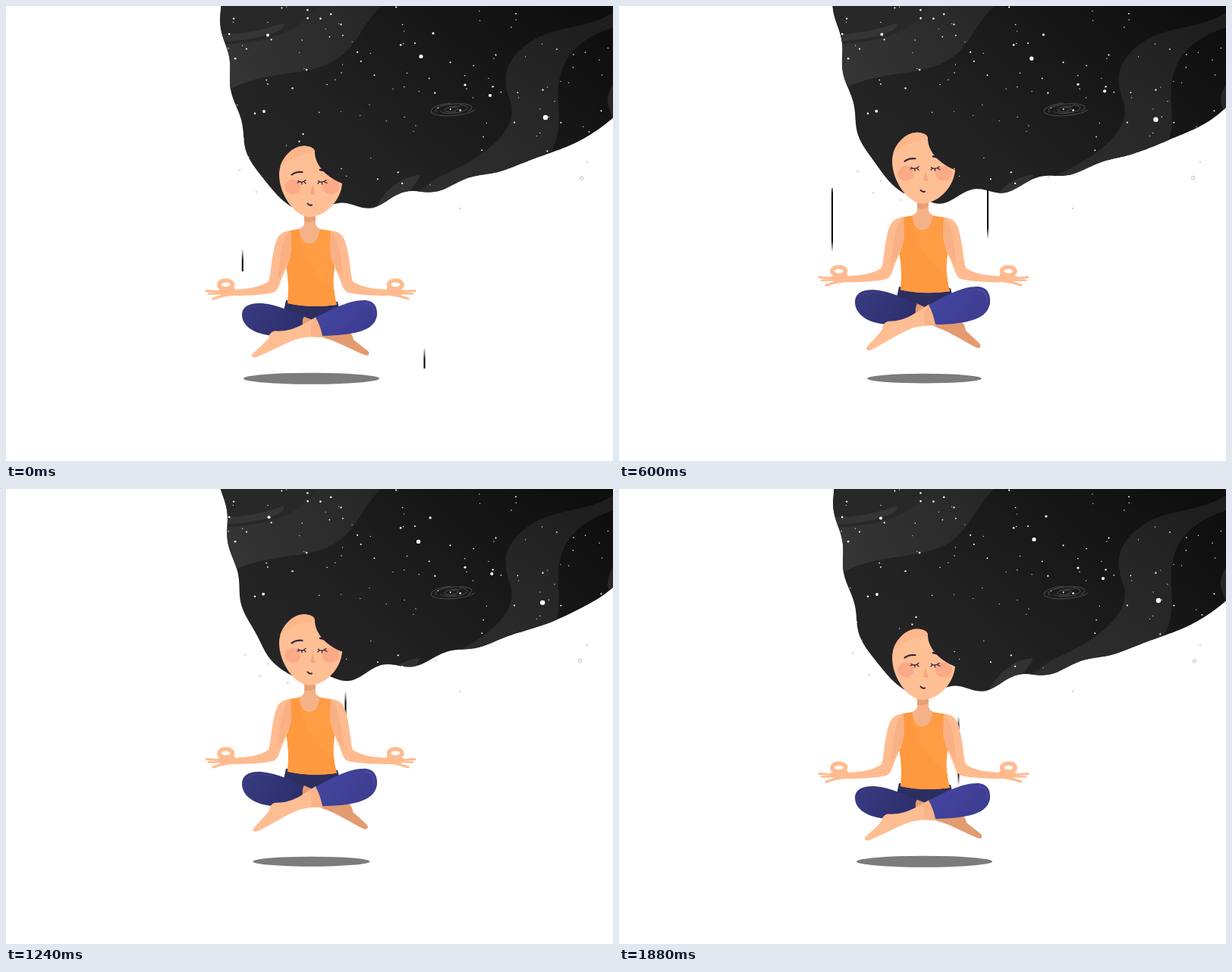
These frames come from a looping animation (800x600 px, 1920 ms). An HTML page with a canvas:

```html
<!DOCTYPE html>
<html lang="en">
<head>
<meta charset="utf-8">
<title>Floating meditation</title>
<style>
html, body { margin: 0; width: 100%; height: 100%; overflow: hidden; background: #fff; }
canvas { display: block; width: 800px; height: 600px; }
</style>
</head>
<body>
<canvas id="stage" width="800" height="600"></canvas>
<script>
const ctx = document.getElementById('stage').getContext('2d');
const LOOP = 1920, CYCLE = 1880, STEP = 40, TAU = Math.PI * 2;
const { sin, cos, exp, max, min, PI } = Math;

function seeded(seed) {
  return () => (seed = (seed * 16807) % 2147483647) / 2147483647;
}

const rand = seeded(2024);
const stars = Array.from({ length: 135 }, () => ({
  x: 285 + 515 * rand(), y: 240 * rand(), r: .6 + .75 * rand() ** 2
}));
// The brightest stars drift: x, y, drift x, drift y, radius
const brightStars = [[547, 66.5, -4.5, 3.8, 2.6], [711, 147, -5, 3.7, 3.2], [638, 118, 3, -8, 2.1],
  [345, 38.5, 2, -1.5, 2], [340, 139, -1, -.5, 1.9], [563, 36, -5, 2.5, 1.6], [605, 104, 0, -1, 1.6]];
const dust = [[308, 216], [330, 245], [341, 229], [369, 255], [566, 226], [598, 267], [766, 206]];

// Each streak rises once: its top edge y at a time, and the span it shows in
const streaks = [
  { x: 311.8, at: 0, y: 320, lo: 120, hi: 350 },
  { x: 311.8, at: 1400, y: 271, lo: 120, hi: 350 },
  { x: 551.5, at: 0, y: 450, lo: 256, hi: 478 },
  { x: 281, at: 440, y: 330, lo: 240, hi: 440 },
  { x: 486, at: 440, y: 313, lo: 100, hi: 318 },
  { x: 447.5, at: 1080, y: 364, lo: 100, hi: 480 },
  { x: 447.5, at: 1880, y: 299, lo: 100, hi: 480 }
];

const rise = phase => (1 - cos(TAU * phase)) / 2;
const lag = phase => phase * phase * sin(PI * phase);

function fill(d, color) {
  ctx.fillStyle = color;
  ctx.fill(new Path2D(d));
}
function line(d, color, width) {
  ctx.strokeStyle = color;
  ctx.lineWidth = width;
  ctx.lineCap = ctx.lineJoin = 'round';
  ctx.stroke(new Path2D(d));
}
function oval(x, y, rx, ry, color) {
  ctx.fillStyle = color;
  ctx.beginPath();
  ctx.ellipse(x, y, rx, ry, 0, 0, TAU);
  ctx.fill();
}
function ramp(x0, y0, x1, y1, ...stops) {
  const g = ctx.createLinearGradient(x0, y0, x1, y1);
  stops.forEach((c, i) => g.addColorStop(i / (stops.length - 1), c));
  return g;
}
function isolated(draw) {
  ctx.save();
  draw();
  ctx.restore();
}

function drawDust(k) {
  for (const [x, y] of dust) {
    const drift = max(0, 400 - x) / 10 * k;
    oval(x + drift, y + drift * .35, 1.3, 1.3, '#d4d4d4');
  }
  ctx.strokeStyle = '#bbb';
  ctx.lineWidth = 1;
  ctx.beginPath();
  ctx.arc(758.5 - 2.7 * k, 227 - .7 * k, 2.1, 0, TAU);
  ctx.stroke();
}

function drawStreaks(t) {
  const len = 92, speed = .61, clear = 'rgba(0,0,0,0)';
  for (const { x, at, y, lo, hi } of streaks) {
    const top = y - (t - at) * speed;
    const a = max(top, lo), b = min(top + len, hi);
    if (b <= a) continue;
    ctx.fillStyle = ramp(0, top, 0, top + len, clear, '#000', '#000', '#000', '#000', '#000', clear);
    ctx.fillRect(x - 1, a, 2, b - a);
  }
}

// Resting edges of the hair, as distances from the stage corners
const leftEdge = y => 282 + .12 * y + .00027 * y * y + 47 * exp((y - 266) / 31);
function rightEdge(x) {
  const s = x - 440;
  return 267.5 - .17 * s - .00033 * s * s - 15.7 * exp((s - 360) / 30) - 12 * exp((390 - x) / 20);
}

// Ripples run along both edges, away from the head
function hairShape(lift, phase) {
  const p = new Path2D();
  const upPhase = phase - .45 * lag(phase);
  const sideLift = 20.75 * rise(phase - .15 * lag(phase));
  p.moveTo(830, -30);
  for (let u = -5; u <= 266; u += 3) {
    const y = u - lift;
    p.lineTo(leftEdge(u) - 2.8 * sin(TAU * ((y - 90) / 83 + upPhase)), y);
  }
  for (let x = 390; x <= 830; x += 4) {
    const amp = min(6.8, max(.6, 6.8 - (x - 483) * .031));
    p.lineTo(x, rightEdge(x) - sideLift + amp * cos(TAU * ((x - 483) / 88 - phase)));
  }
  p.closePath();
  return p;
}

function drawGalaxy() {
  ctx.translate(590, 136);
  ctx.rotate(-.09);
  ctx.strokeStyle = '#4c4c4c';
  ctx.lineWidth = 1;
  for (let i = 0; i < 5; i++) {
    ctx.beginPath();
    ctx.ellipse(0, 0, 30 - 6 * i, 8.5 - 1.6 * i, 0, .4 + 2.4 * i, 4.6 + 2.4 * i);
    ctx.stroke();
  }
}

function drawComet(t) {
  const glow = 1 - Math.abs(t - 440) / 150;
  if (glow <= 0) return;
  ctx.globalAlpha = glow;
  ctx.translate(442 - (t - 440) * .12, 38 - (t - 440) * .095);
  ctx.rotate(.675);
  fill('M0 -4Q-4 0 0 4L30 2.5L62 0L30 -2Z',
    ramp(-3, 0, 62, 0, 'rgba(150,150,150,.5)', '#e8e8e8', '#aaa', 'rgba(150,150,150,.4)', 'rgba(120,120,120,0)'));
}

function drawHair(t, lift, phase, k) {
  const shape = hairShape(lift, phase);
  ctx.fillStyle = ramp(400, 270, 690, -60, '#252525', '#222', '#1b1b1b', '#151515', '#0e0e0e');
  ctx.fill(shape);
  ctx.clip(shape);
  fill('M270 -5H415C400 22 375 46 330 49Q305 51 270 48Z', '#282828');
  fill('M270 50C330 51 385 42 414 -5H500C470 20 466 50 436 70C400 95 340 82 290 113L270 118Z',
    ramp(290, 100, 490, 0, '#363636', '#2e2e2e', '#262626'));
  fill('M270 36C310 40 345 30 363 23Q371 23 362 31C340 43 310 46 270 48Z', '#353535');
  fill('M805 5C770 32 725 24 690 48C650 76 656 104 666 130C674 172 616 206 570 226L535 250L670 240C720 206 732 180 728 130C724 84 740 45 805 27Z',
    ramp(600, 230, 760, 20, '#2d2d2d', '#272727', '#1e1e1e'));
  fill('M805 96Q792 112 793 128L800 150H810Z', '#282828');
  fill('M546 223C520 224 497 244 486 270C510 258 535 249 546 223Z', '#323232');
  isolated(drawGalaxy);
  for (const { x, y, r } of stars) oval(x, y, r, r, '#fff');
  for (const [x, y, dx, dy, r] of brightStars) oval(x + dx * k, y + dy * k, r, r, '#fff');
  drawComet(t);
}

function drawArm() {
  const skin = '#ffbb8f';
  fill('M375 297C361 296 356 306 353 322C349 340 349 354 346 363C335 371 318 373 300 374L299 382C320 382 338 381 352 378C358 376 360 368 363 360C368 347 376 335 376 318Z', skin);
  fill('M374 297C368 301 363 318 361 336L358 362C364 350 376 336 376 318Z', '#f9b083');
  line('M300 377L284 377L264 375.5', skin, 3);
  line('M298 379L267 379.5', skin, 2.6);
  line('M298 380L286 382L273 386', skin, 3.2);
  fill('M279 374L301 371L303 381L284 384Z', skin);
  ctx.strokeStyle = skin;
  ctx.lineWidth = 5.5;
  ctx.beginPath();
  ctx.ellipse(289.7, 367.5, 8.7, 5.5, 0, -1.35, TAU - 1.75);
  ctx.stroke();
}

function turned(angle, d, color) {
  isolated(() => {
    ctx.translate(405, 420);
    ctx.rotate(angle);
    ctx.translate(-405, -420);
    fill(d, color);
  });
}

// The crossed legs hang a little lower as the body rises
function drawLegs(k) {
  fill('M369 388L437 390L440 402L403 417L366 402Z', '#2d2e60');
  ctx.translate(0, 390);
  ctx.scale(1, 1 + .08 * k);
  ctx.translate(0, -390);
  turned(.06 * k, 'M391 409L420 420L453 430Q457 434 458 440L477 455Q481 460 475 461C460 456 440 443 417 437L389 420Z', '#e39b70');
  fill('M311 407C311 396 321 391 337 392C360 394 377 404 393 409Q390 414 391 420C381 432 366 437 345 434C325 431 311 421 311 407Z',
    ramp(320, 395, 380, 435, '#383a80', '#2d2e6c'));
  line('M318 400Q328 392 350 397', '#41438c', 1);
  turned(-.06 * k, 'M409 410C390 420 378 430 354 428.5Q347 430 346 438C340 446 330 453 324 460Q324 465 330 463C350 455 372 442 388 438Q402 435 418 437Z', '#ffbd92');
  turned(-.06 * k, 'M409 411L402 416V436L418 437Z', '#fab487');
  fill('M408 411C428 401 450 388 472 388C485 388 490 397 489 408C486 427 464 434 417 435Q414 420 408 411Z',
    ramp(420, 395, 470, 435, '#4445a0', '#3c3d8f'));
  line('M473 392Q486 393 485 407', '#5354a8', 1);
}

function drawTorso() {
  const shirt = 'M371 297L387 294C387 306 393 313 400 313C407 313 413 306 413 294L432 297C429 315 432 330 435 338C430 354 431 376 436 394Q402 399 371 392C373 370 372 354 368 337Q374 320 371 297Z';
  fill('M393 273H408V288Q410 292 414 294V306L400 315L386 306V294Q391 292 393 288Z', '#f5b288');
  fill('M393 277H408V282Q400 288 393 284Z', '#e7a078');
  fill(shirt, '#ff9d45');
  isolated(() => {
    ctx.clip(new Path2D(shirt));
    fill('M360 290L385 294C388 325 406 358 440 380V400H360Z', '#ff9940');
  });
  drawArm();
  isolated(() => {
    ctx.translate(803, 0);
    ctx.scale(-1, 1);
    drawArm();
  });
}

function drawHead() {
  const ink = '#3b2440', blush = 'rgba(246,138,115,.4)';
  const face = 'M360 222C361 201 377 184.5 393 184.5C401 184.5 408 188 407 194C408 212 425 227 443 234C441 258 420 278 400 278C381 278 360 249 360 222Z';
  fill(face, '#ffbf95');
  fill('M361 213C365 198 379 184.5 393 184.5C401 184.5 408 188 407 194C391 194 374 201 361 213Z', '#fcb78b');
  isolated(() => {
    ctx.clip(new Path2D(face));
    oval(378, 238.5, 10.5, 10, blush);
    oval(428, 238.5, 11.5, 10, blush);
  });
  line('M376.5 222.5Q382 218 390.5 219', ink, 2.2);
  line('M414 216Q425 217 431 226', '#2d1c31', 2.5);
  line('M385 230.5Q390 234.5 395 229.5M386.5 232L384 233M390 233V235M393 232L395 234', ink, 1.3);
  line('M411.5 230.5Q416.5 234.5 422 229.5M413 232L411 234M416.5 233V235M420 232L423 233.5', ink, 1.3);
  fill('M404 235L401 248Q404 250 407.5 248Z', '#f3a981');
  line('M397.5 260.5Q399.5 263.5 403 262.5', ink, 2);
}

function render(t) {
  const phase = t / CYCLE, k = rise(phase), lift = 25 * k;
  // The shadow and feet peak a little before the body does
  const early = rise(t < 860 ? t / 1720 : (CYCLE - t) / 2040);
  ctx.fillStyle = '#fff';
  ctx.fillRect(0, 0, 800, 600);
  drawStreaks(t);
  drawDust(k);
  oval(402.5, 491.2, 89.5 - 18 * early, 7.5 - 1.4 * early, '#7c7c7c');
  isolated(() => drawHair(t, lift, phase, k));
  isolated(() => {
    ctx.translate(0, -lift);
    isolated(() => drawLegs(early));
    drawTorso();
    drawHead();
  });
}

const start = performance.now();
function tick() {
  const t = (performance.now() - start) % LOOP;
  render(Math.floor(t / STEP) * STEP);
  requestAnimationFrame(tick);
}
tick();
</script>
</body>
</html>
```
